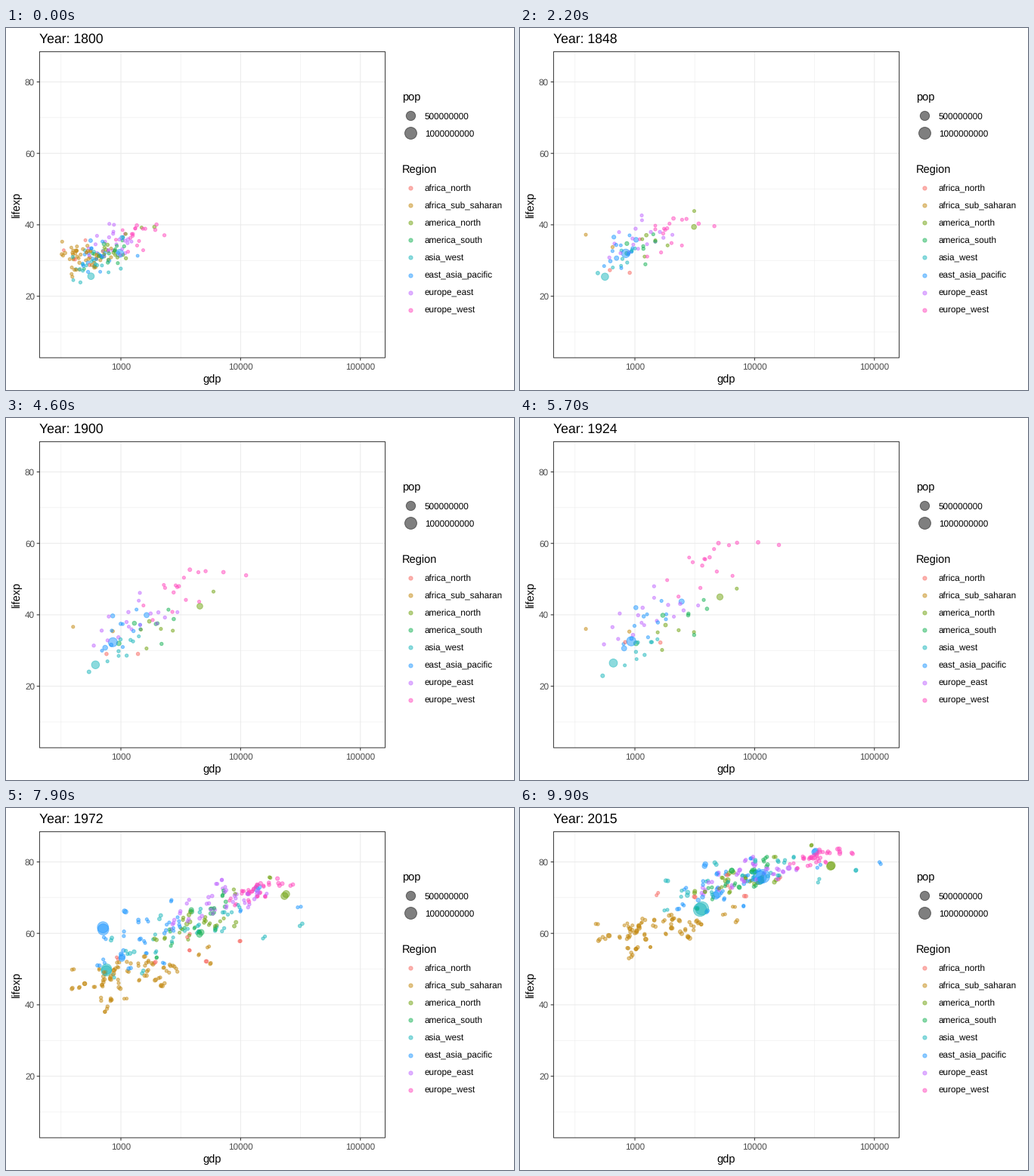
These frames come from a looping animation (672 px wide and 480 px high, 10000 ms). A matplotlib script:

```python
from itertools import accumulate

import numpy as np
import matplotlib.pyplot as plt
from matplotlib.animation import FuncAnimation
from matplotlib.patches import Rectangle

FRAMES, START, END = 100, 1800, 2015
STEP = (FRAMES - 1) / (END - START)
KEY_YEARS = [1800, 1872, 1924, 1972, 2015]

# colour, countries, countries with yearly records before 1950,
# late spread of log gdp and life, then log gdp and life at the key years
REGIONS = {
    "africa_north": ("#F8665F", 6, 2, .32, 3.5,
                     [2.69, 2.96, 3.08, 3.52, 3.73], [32, 29, 36, 55, 73]),
    "africa_sub_saharan": ("#C48A12", 47, 2, .28, 4.6,
                           [2.68, 2.90, 2.99, 3.08, 3.18], [31, 34, 34, 48, 61]),
    "america_north": ("#70A310", 15, 6, .24, 4,
                      [2.94, 3.28, 3.35, 3.69, 3.91], [33, 36, 35, 64, 75.5]),
    "america_south": ("#17B356", 14, 6, .18, 4,
                      [2.90, 3.03, 3.33, 3.66, 3.88], [32, 32, 37, 64, 75.5]),
    "asia_west": ("#1BB7BC", 20, 9, .42, 5,
                  [2.75, 2.91, 2.97, 3.56, 3.90], [29, 29, 27, 60, 75.5]),
    "east_asia_pacific": ("#1F98FF", 21, 11, .38, 5.8,
                          [2.80, 2.96, 3.15, 3.29, 3.84], [31, 32, 37, 60, 74]),
    "europe_east": ("#C067FF", 23, 17, .22, 3.2,
                    [2.92, 3.11, 3.13, 3.83, 3.96], [35, 37, 40, 69, 76.5]),
    "europe_west": ("#FF48BE", 20, 17, .12, 1.6,
                    [3.13, 3.40, 3.68, 4.14, 4.53], [37, 39, 55.5, 72, 81.4]),
}
COLORS = np.array([row[0] for row in REGIONS.values()])

# Most populous countries: region, millions in 1800, 1950 and 2015, paths as above
GIANTS = [
    (5, [322, 550, 1376], [2.99, 2.89, 2.97, 2.85, 4.07], [32, 32, 32.6, 61.7, 76]),
    (4, [170, 376, 1310], [2.75, 2.75, 2.82, 2.88, 3.56], [25.6, 25.4, 26.5, 50, 67]),
    (2, [6, 158, 321], [3.28, 3.60, 3.71, 4.38, 4.64], [39.4, 39.4, 45, 71, 79]),
    (3, [3, 54, 207], [2.90, 2.95, 3.01, 3.67, 4.05], [32, 32, 32, 60.3, 75]),
    (5, [16, 72, 257], [2.90, 2.82, 2.91, 3.01, 3.69], [30, 31, 30.6, 53.5, 71]),
    (5, [30, 82, 126], [3.01, 3.01, 3.39, 4.15, 4.51], [36.4, 35.5, 43.7, 73, 83]),
]
# Brief collapses: year, region, log gdp, life
CRISES = [(1822, 0, 2.716, 6.6), (1921, 6, 3.08, 15), (1977, 5, 2.84, 16.5), (1994, 1, 2.70, 13)]

rng = np.random.default_rng(12)


def scores(n):
    """Standard scores, income skewed to the right of wealth."""
    wealth, health = np.clip(rng.normal(size=(2, n)), -2.2, 2.2)
    wealth = (wealth - wealth.mean()) / wealth.std()
    health = (health - health.mean()) / health.std()
    income = np.exp(.3 * wealth)
    return (income - income.mean()) / income.std(), wealth, health


SCORES = [scores(row[1]) for row in REGIONS.values()]
OFFSETS = [0, *accumulate(row[1] for row in REGIONS.values())]
POPS = rng.lognormal(1.4, 1.1, OFFSETS[-1])
NOISE = rng.normal(size=(2, OFFSETS[-1], END - START + 1))


def to_stage(log_gdp, life):
    return 152 + 158.4 * (np.asarray(log_gdp) - 3), 71.5 + 4.736 * (80 - np.asarray(life))


def countries(year, dense):
    """Rows of log gdp, life, millions and region for one year."""
    rows = []
    link = np.interp(year, [1800, 1924], [.25, .65])
    shrink = np.interp(year, [1972, 2015], [1, .78])
    grow = np.interp(year, [1800, 1950, 2015], [.2, .5, 1])
    for reg, (_, n_all, n_few, sx, sy, gdp, life) in enumerate(REGIONS.values()):
        n = n_all if dense else n_few
        income, wealth, health = (s[:n] for s in SCORES[reg])
        own = slice(OFFSETS[reg], OFFSETS[reg] + n)
        jitter = NOISE[:, own, year - START]
        spread_x = np.interp(year, [1800, 1924, 1972], [.1, .22, sx])
        spread_y = np.interp(year, [1800, 1924, 1972], [2.3, 4.2, sy]) * shrink
        x = np.interp(year, KEY_YEARS, gdp) + spread_x * income + .008 * jitter[0]
        y = (np.interp(year, KEY_YEARS, life) + .25 * jitter[1]
             + spread_y * (link * wealth + np.sqrt(1 - link ** 2) * health))
        rows += zip(x, y, POPS[own] * grow, [reg] * n)
    for reg, pops, gdp, life in GIANTS:
        rows.append((np.interp(year, KEY_YEARS, gdp), np.interp(year, KEY_YEARS, life),
                     np.interp(year, [1800, 1950, 2015], pops), reg))
    return rows


def points(k):
    years = [y for y in range(START, END + 1) if round((y - START) * STEP) == k]
    rows = [(x, y, 3, reg) for year, reg, x, y in CRISES if year in years]
    if k < 69:
        rows += countries(round(START + k / STEP), dense=k < 12)
    else:
        # yearly data: every year in the step is shown, so dots come in pairs
        for year in years:
            rows += countries(year, dense=True)
    rows = np.array(rows, dtype=float)
    rows = rows[np.random.default_rng(7).permutation(len(rows))]
    return np.column_stack(to_stage(rows[:, 0], rows[:, 1])), rows[:, 2], rows[:, 3].astype(int)


def area(size):
    """Marker area in square points for a plot size on the 1 to 6 scale."""
    return (.75 * (size * 2.845 + .945)) ** 2


def pop_area(pop):
    return area(1 + 5 * np.sqrt(np.asarray(pop) / 1376))


plt.rcParams["font.family"] = "Liberation Sans"
plt.rcParams["text.hinting"] = "none"
fig = plt.figure(figsize=(7, 5), dpi=96, facecolor="white")
ax = fig.add_axes([0, 0, 1, 1])
ax.set(xlim=(0, 672), ylim=(480, 0))
ax.axis("off")

LEFT, TOP, RIGHT, BOTTOM = 44.4, 31.4, 501.6, 437.2
GREY, DARK, TEXT = "#EBEBEB", "#333333", "#4D4D4D"


def line(x, y, width=1.07, color=GREY):
    ax.plot(x, y, color=color, lw=width * .75, solid_capstyle="butt", snap=False, zorder=1)


def label(x, y, text, size=8.8, color="black", **kw):
    return ax.text(x, y, text, fontsize=size, color=color, va="baseline", **kw)


def dots(x, y, s, color):
    return ax.scatter(x, y, s=s, c=color, alpha=.5, linewidths=.71, edgecolors="face",
                      snap=False, zorder=3)


for log_gdp in np.arange(2.5, 5.1, .5):
    x, _ = to_stage(log_gdp, 0)
    major = log_gdp % 1 == 0
    line([x, x], [TOP, BOTTOM], 1.07 if major else .53)
    if major:
        line([x, x], [BOTTOM, BOTTOM + 3.7], color=DARK)
        label(x, 453, f"{10 ** log_gdp:.0f}", color=TEXT, ha="center")
for life in range(10, 81, 10):
    _, y = to_stage(0, life)
    major = life % 20 == 0
    line([LEFT, RIGHT], [y, y], 1.07 if major else .53)
    if major:
        line([LEFT - 3.7, LEFT], [y, y], color=DARK)
        label(38, y + 4.2, f"{life}", color=TEXT, ha="right")
ax.add_patch(Rectangle((LEFT, TOP), RIGHT - LEFT, BOTTOM - TOP, fill=False,
                       ec=DARK, lw=.75, snap=False, zorder=4))

label(273, 470, "gdp", 11, ha="center")
label(18, 234.5, "lifexp", 11, ha="center", rotation=90, rotation_mode="anchor")
title = label(44, 20, "", 13.2)

label(524, 96, "pop", 11)
for i, pop in enumerate((500, 1000)):
    y = 116.3 + 23.04 * i
    dots([535.4], [y], [pop_area(pop)], ["black"])
    label(554, y + 4.3, f"{pop}000000")
label(524, 192, "Region", 11)
for i, name in enumerate(REGIONS):
    y = 212.3 + 23.04 * i
    dots([535.4], [y], [area(1.5)], [COLORS[i]])
    label(554, y + 4.3, name)

spots, pops, regs = points(0)
cloud = dots(spots[:, 0], spots[:, 1], pop_area(pops), COLORS[regs])


def update(k):
    spots, pops, regs = points(k)
    cloud.set_offsets(spots)
    cloud.set_sizes(pop_area(pops))
    cloud.set_facecolor(COLORS[regs])
    title.set_text(f"Year: {round(START + k / STEP)}")
    return cloud, title


anim = FuncAnimation(fig, update, frames=FRAMES, interval=100, repeat=True, repeat_delay=0)
plt.show()
```
